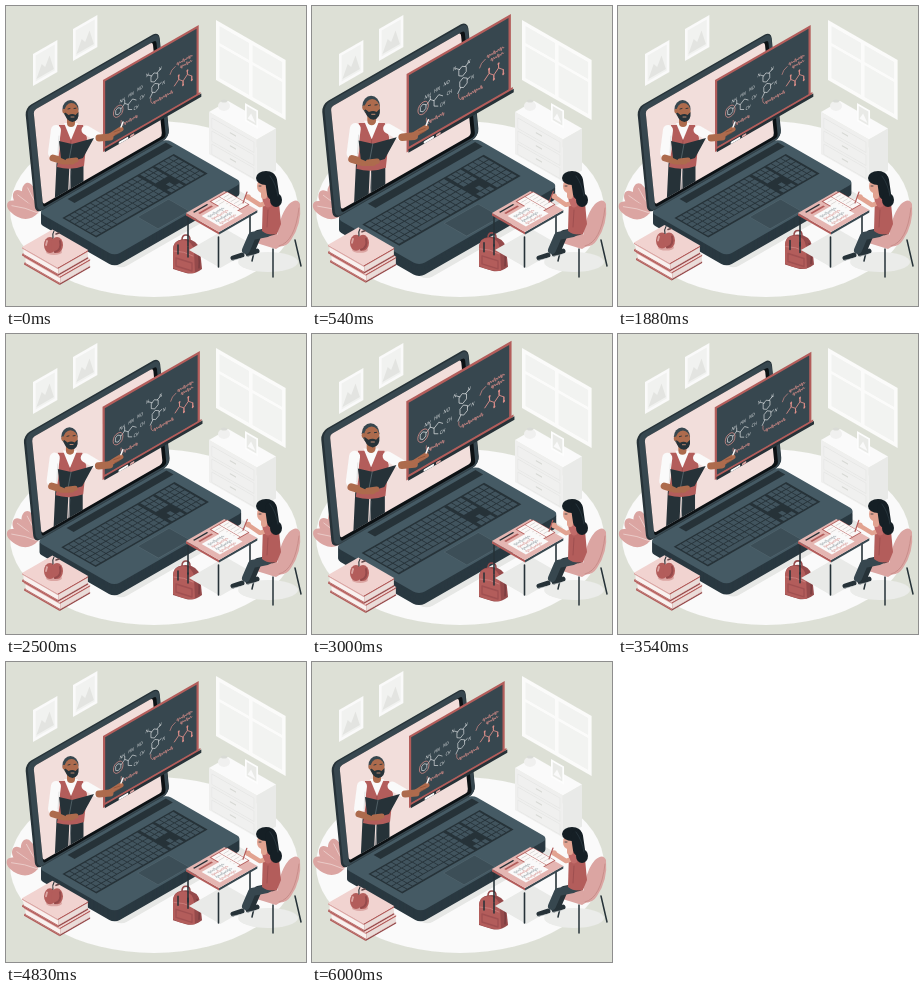
An HTML page that plays this animation: 300x300 px, repeating every 6040 ms.

```html
<!DOCTYPE html>
<html lang="en">
<head>
<meta charset="utf-8">
<title>Online lesson</title>
<style>
html, body { margin: 0; width: 100%; height: 100%; overflow: hidden; background: #dde0d6; }
svg { display: block; width: 100%; height: 100%; }
text { font: italic 4.6px "Open Sans", sans-serif; }
</style>
</head>
<body>
<svg id="stage" viewBox="0 0 300 300"></svg>
<script>
const INK = '#263238', SLATE = '#37474f', STEEL = '#455a64', RED = '#b35d5b', DEEP = '#954a4b',
  PINK = '#dba5a2', BLUSH = '#f2dedb', SKIN = '#ad6b4d', FAIR = '#e2a391', PALE = '#fafafa', GREY = '#e4e5e3';

// Plain drawing helpers
const shape = (d, fill) => `<path d="${d}" fill="${fill}"/>`;
const line = (d, color, width = 1) =>
  `<path d="${d}" fill="none" stroke="${color}" stroke-width="${width}" stroke-linecap="round" stroke-linejoin="round"/>`;
const oval = (x, y, rx, ry, fill) => `<ellipse cx="${x}" cy="${y}" rx="${rx}" ry="${ry}" fill="${fill}"/>`;
const rect = (x, y, w, h, fill, r = 0) =>
  `<rect x="${x}" y="${y}" width="${w}" height="${h}" rx="${r}" fill="${fill}"/>`;
const group = (content, attrs) => `<g ${attrs}>${content}</g>`;
const repeat = (count, make) => Array.from({ length: count }, (_, i) => make(i)).join('');

// Isometric planes: walls that rise or fall to the right, and the floor
const AXIS = { rise: '.87 -.5 0 1', fall: '.87 .5 0 1', floor: '.87 -.5 .87 .5', screen: '.87 -.5 .1 1' };
const plane = (kind, x, y, content) => group(content, `transform="matrix(${AXIS[kind]} ${x} ${y})"`);

// Box by its left corner; depth runs down to the right, width up to the right
function box(x, y, depth, width, height, [top, left, right]) {
  return plane('fall', x, y, rect(0, 0, depth, height, left)) +
    plane('rise', x + .87 * depth, y + .5 * depth, rect(0, 0, width, height, right)) +
    plane('floor', x, y, rect(0, 0, width, depth, top));
}

function room() {
  const picture = (x, y) => plane('rise', x, y,
    rect(0, 0, 28, 32, PALE) + rect(3, 3, 22, 26, '#f1f2f0') + shape('M4 27l6-12 4 5 5-9 5 16z', '#e3e4e1'));
  const panes = repeat(2, i => rect(4 + i * 38, 4, 34, 17, '#f2f3f1') + rect(4 + i * 38, 24, 34, 32, '#f2f3f1'));
  const drawers = repeat(3, i => rect(3, 4 + i * 13, 49, 11, '#e4e5e3') + rect(3.6, 4.6 + i * 13, 47.8, 9.8, '#f0f0ef') +
    rect(24, 8 + i * 13, 7, 1.2, '#d6d8d4'));
  return oval(148, 203, 144, 88, PALE) + picture(27, 48) + picture(67, 23) +
    plane('fall', 210, 14, rect(0, 0, 80, 60, '#fbfbfa') + panes) +
    box(203, 106, 55, 22, 42, [PALE, '#efefee', '#e9eae8']) + plane('fall', 203, 106, drawers) +
    oval(218, 100, 6, 5, '#f0f0ef') + oval(218, 95, 3, 1.5, '#d9dbd6') +
    plane('fall', 239, 97, rect(0, 0, 15, 18, '#fdfdfd') + rect(2, 2, 11, 14, '#e9eae7') + shape('M3 14l4-7 5 7z', PALE));
}

function plant() {
  const leaf = angle => group(
    shape('M0 0C-10-4-14-14-8-27-5-33 1-34 3-28 8-19 7-7 0 0z', PINK) + line('M0 0Q1-14-2-27', BLUSH, .6),
    `transform="translate(32 207) rotate(${angle})"`);
  return repeat(3, i => leaf(-18 - i * 26));
}

function keyboard() {
  const blocks = [[1.5, 14, 6], [88, 3, 5], [105, 4, 5.4]];
  const keys = repeat(6, row => blocks.map(([start, count, pitch], block) => repeat(count, i => {
    const spaceBar = row === 5 && block === 0 && i > 3 && i < 9;
    const empty = block === 1 && (row === 3 || row === 4 && i !== 1);
    return spaceBar || empty ? '' : rect(start + i * pitch, 1.5 + row * 6.1, pitch - .8, 5.2, '#41545e');
  })).join(''));
  return group(rect(0, 0, 128, 39, INK) + keys + rect(25.5, 32, 29, 5.2, '#41545e'), 'transform="translate(8 20)"');
}

function laptop() {
  const base = (dy, fill) => plane('floor', 32, 206 + dy, rect(0, 0, 147, 88, fill, 6));
  return plane('floor', 37, 218, rect(0, 0, 146, 90, '#e6e7e5', 6)) +
    repeat(11, i => base(11 - i, '#293840')) + base(0, STEEL) +
    plane('floor', 32, 206, rect(30, 4, 113, 8, INK) + keyboard() +
      rect(52, 62, 36, 24, '#53666f') + rect(52.5, 62.5, 35, 23, '#3c4e57')) +
    plane('screen', 19, 102, rect(0, 0, 154, 106, INK, 7) + rect(2.5, 1.5, 151, 104, SLATE, 6) +
      rect(9, 7, 141, 97, '#0c1114', 3) + rect(9, 7, 137, 94, BLUSH, 3));
}

function teacher() {
  const legs = line('M57 158L55 200M71 158V200', INK, 13) + line('M65 165l-2 25', '#4a5b63', .6);
  const torso = shape('M53 119h24l4 13-3 28q-13 5-27 1l3-20z', RED) +
    shape('M58 117l7 17 7-17z', PALE) + line('M65 134l-1 24', DEEP, .8);
  const sleeves = line('M50 124L47 147', PALE, 10) + line('M80 124L92 131', PALE, 9) + line('M53 130l-1 17', '#d7d9d8', .7);
  const head = line('M65 110V117', SKIN, 8) + oval(64.5, 103, 8, 9, SLATE) + oval(65.5, 105.5, 7, 8.5, SKIN) +
    shape('M58.5 106q3 2 4 3 4-2 7 0l3-3q1 9-6 10-7-1-8-10z', INK) + line('M65 111h3', '#c58d74', .9) +
    line('M62 103l2-.5M68 102.5l2-.3', INK, .9) + oval(58, 105, 1.6, 2.2, SKIN);
  const book = shape('M53 135l13 3 22-6-11 20-13 4-9-4z', INK) + line('M66 138l-3 16', '#617178', .7);
  return group(legs + torso + sleeves + head + line('M47 152l10 3 9 0', SKIN, 7) + book +
    line('M62 155l8-1', SKIN, 5), 'clip-path="url(#screenEdge)"');
}

function scribble(x, y, count, color) {
  return line(`M${x} ${y}` + repeat(count, i => `q1 ${i % 3 ? -1.6 : -3.4} 1.2 0t1 ${i % 2 ? .5 : -.5}`), color, .6);
}

function hexagon(x, y, r, color) {
  const corner = i => `${x + r * Math.sin(i * Math.PI / 3)} ${y - r * Math.cos(i * Math.PI / 3)}`;
  return line('M' + repeat(6, i => (i ? 'L' : '') + corner(i)) + 'z', color, .6);
}

function chalkboard() {
  const rose = '#dd8f8a', white = '#e8ebec';
  const label = (x, y, s) => `<text x="${x}" y="${y}" fill="${white}">${s}</text>`;
  const labels = ['NH', 'HN', 'NO'].map((s, i) => label(13 + i * 10, 27 - i, s)).join('') +
    label(29, 42, 'CH') + label(36, 35, 'CH') + label(43, 16, 'N') + label(58, 17, 'N') + label(62, 33, 'N');
  const bonds = hexagon(11.5, 34, 3.4, white) + hexagon(53, 21, 4.5, white) + hexagon(54, 32, 4.5, white) +
    line('M15 33l4-3 4 3 5-3 4 3M23 33v5l4 2M19 30v-3M56 18l4-2M50 18l-4-3M58 31l3-1M51 35l-3 4', white, .6);
  const branch = line('M76 41' + repeat(4, i => `l5 ${i % 2 ? 4 : -4}v${i % 2 ? 4 : -4}v${i % 2 ? -4 : 4}`), rose, .8) +
    repeat(4, i => oval(81 + i * 5, i % 2 ? 45 : 33, 1.1, 1.1, rose));
  const notes = `<circle cx="11.5" cy="34" r="5.5" fill="none" stroke="${rose}" stroke-width=".7"/>` +
    scribble(18, 50, 7, rose) + scribble(52, 46, 10, rose) + scribble(79, 21, 8, rose) + scribble(83, 26, 6, rose) +
    line('M17 51q-3-2-2-6M51 46q-3-2-2-6M77 22q-5 1-6 5', rose, .6);
  return plane('rise', 97, 74, rect(0, 0, 110, 72, RED) + rect(2.5, 2.5, 105, 66, SLATE) +
    group(labels + bonds + branch + notes, 'transform="translate(6 6)"') +
    rect(1, 68, 111, 2, RED) + rect(2, 70, 111, 3.2, INK) +
    rect(18, 71, 11, 2.2, PALE, 1) + rect(31, 71, 5, 2, PINK, 1));
}

function pointingHand() {
  return line('M93 132L104 131', SKIN, 7) + line('M102 131L110 126L115 123', SKIN, 5) +
    line('M108 126l6-2M109 129l5-2', '#85492f', .5) + line('M115 121l2-5', PALE, 1.4);
}

function books() {
  const volume = (x, y) =>
    box(x, y + 7, 41, 35, 1.5, [RED, RED, DEEP]) +
    box(x + 1.5, y + 1, 40, 34, 6, [PALE, '#f9f1ef', '#eadcd9']) +
    box(x, y, 41, 35, 1.5, ['#f1d3d0', PINK, RED]);
  const apple = oval(48, 246, 8, 3, PINK) + oval(44, 239, 6, 8, RED) + oval(51, 239, 6, 8, RED) +
    line('M54 235Q56 244 49 246', DEEP, 2) + line('M41 235l-1 4', PINK, 1.8) +
    line('M47 232Q46 228 48 225', INK, 1.1) + line('M50 228l3-1', '#64484a', 1.6);
  return volume(18, 250) + volume(16, 241) + apple;
}

function backpack() {
  return line('M176 234q0-5 4-5t4 5', DEEP, 1.6) +
    shape('M167 244q0-11 13-11 12 1 14 11l2 19q-8 6-16 4l-13-4z', DEEP) +
    shape('M167 244q0-10 10-10 10 1 11 11l1 22q-11 1-22-5z', RED) +
    line('M170 252l16 5v8l-16-5z', '#a05051', 1.4) + line('M168 245q10 0 19 5', '#cf8582', .8) +
    line('M172 239v9M182 241v10', INK, 1.5) + line('M191 242q3 8 2 20', '#743b3f', 1.2);
}

function desk() {
  const notes = repeat(4, i => scribble(9, 17 + i * 4.5, 8, i % 2 ? PINK : '#a5aeb2'));
  const page = x => rect(x, 3, 9, 24, '#fbf8f7') + repeat(5, i => rect(x + 1.5, 6 + i * 4, 6, .7, '#c9c5c3'));
  const leg = (x, y) => line(`M${x} ${y}v30`, INK, 1.6);
  return plane('floor', 183, 244, rect(0, 0, 42, 36, '#e9eae8')) +
    leg(182, 210) + leg(212.5, 231) + leg(244, 209) +
    box(180, 207, 38, 44, 2.5, ['#e5b6b2', RED, SLATE]) +
    plane('floor', 180, 207, rect(25, 2, 20, 26, RED) + page(26) + page(35.5) +
      rect(6, 12, 26, 21, PALE) + notes + rect(5, 3, 16, 1.6, INK) + rect(7, 7, 15, 2, RED));
}

function student() {
  const shoe = (x, y) => line(`M${x} ${y}l9-3`, INK, 5) + line(`M${x - 2} ${y + 2.5}l10-2`, '#c7cccd', .6);
  const leg = (x, y, fill) => line(`M${x + 18} ${y - 3}L${x + 3} ${y}L${x - 3} ${y + 14}`, fill, 8);
  const arm = line('M261 197L254 199L243 192', FAIR, 4.5) + oval(242, 191, 2.8, 2.8, FAIR) + line('M237 197l4-11', RED, 1.2);
  return oval(262, 256, 30, 10, '#ebecea') +
    line('M250 238l-4 17M267 243v28M289 234l6 26', INK, 1.5) +
    shape('M244 235l25-8 14 8-13 8z', PINK) +
    shape('M271 240q0-28 12-42 8-7 11 0 2 20-9 36-5 8-14 6z', PINK) + line('M273 240q16-4 20-38', '#c58885', .8) +
    shoe(242, 248) + leg(249, 228, INK) + shoe(227, 252) + leg(243, 230, SLATE) +
    shape('M257 190q10-3 16 7l2 21-4 10q-9 2-15-3z', RED) + line('M262 204l-1 17', DEEP, .7) +
    group(arm, 'id="arm"') + line('M260 193L262 198', '#c16b69', 7) +
    line('M258 180v10', FAIR, 6) + oval(256, 180, 5, 7, FAIR) +
    oval(260, 172, 10, 7, '#151f25') + line('M265 174L267 188', '#151f25', 12) + oval(270, 194, 6, 7, '#151f25') +
    line('M264 170q6 8 8 20', '#32424b', .6) + line('M253 180h2', INK, .8);
}

document.getElementById('stage').innerHTML =
  '<clipPath id="screenEdge"><path d="M0 0H300V47L0 220z"/></clipPath>' +
  rect(0, 0, 300, 300, '#dde0d6') + room() + group(plant(), 'id="plant"') +
  group(laptop() + teacher() + chalkboard() + pointingHand(), 'id="laptop"') +
  group(books(), 'id="books"') + group(backpack(), 'id="backpack"') + desk() + student();

const [plantPart, laptopPart, booksPart, backpackPart, armPart] =
  ['plant', 'laptop', 'books', 'backpack', 'arm'].map(id => document.getElementById(id));
const LOOP = 6040, BEAT = 6000, FLOAT = 3000, WRITE = 5650;
const move = (part, value) => part.setAttribute('transform', value);

// Linear rise to 1 at the peak, then linear fall
const beat = (t, start, peak, end) =>
  Math.max(0, Math.min((t - start) / (peak - start), (end - t) / (end - peak)));

function draw(now) {
  const t = Math.min(now % LOOP, BEAT);
  const pulse = beat(t, 0, 600, 1800) + beat(t, 2400, 3000, 3600);
  const lift = 1 - Math.abs(1 - 2 * (t % FLOAT) / FLOAT);
  const writing = t < WRITE ? Math.sin(t / WRITE * Math.PI * 6) * 1.8 : 0;
  move(laptopPart, `translate(124 141) scale(${1 + pulse * .1}) translate(-124 -141)`);
  move(booksPart, `translate(0 ${-6 * lift})`);
  move(backpackPart, `translate(0 ${-6 * lift})`);
  move(plantPart, `rotate(${-3 * lift} 31 212)`);
  move(armPart, `rotate(${writing} 261 197)`);
}

const origin = performance.now();
function tick() {
  draw(performance.now() - origin);
  requestAnimationFrame(tick);
}
tick();
</script>
</body>
</html>
```
